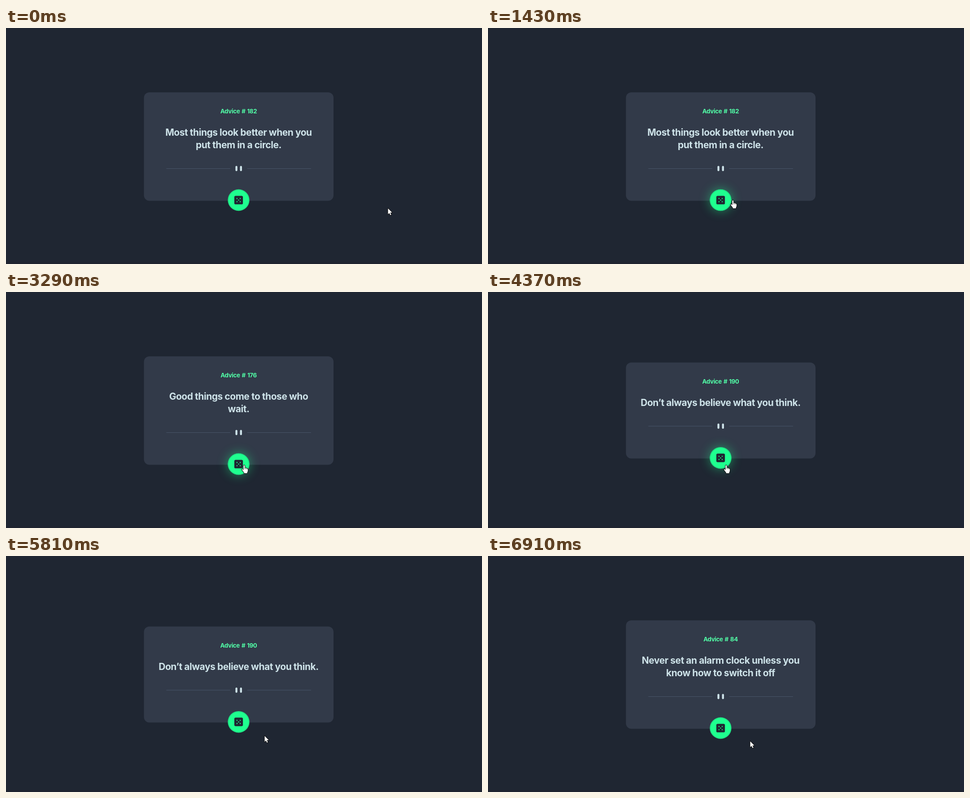
Recreate the animation shown at these times as an HTML page with a canvas. Size 1061 px wide and 528 px high, loop 8060 ms.

```html
<!DOCTYPE html>
<html lang="en">
<head>
<meta charset="utf-8">
<title>Advice generator</title>
<style>
  html, body { margin: 0; width: 100%; height: 100%; overflow: hidden; background: #1f2632; }
  canvas { position: absolute; left: 0; top: 0; width: 1061px; height: 528px; }
  p {
    position: absolute; left: 308px; width: 421px; margin: 0;
    text-align: center; white-space: pre; font-family: Inter, "Open Sans", sans-serif; font-weight: 700;
  }
  #label { top: 175.5px; font-size: 13.4px; line-height: 20px; letter-spacing: -0.4px; word-spacing: 1.2px; color: #52ffa8; }
  #quote { top: 220.4px; font-size: 21px; line-height: 28px; letter-spacing: -0.47px; color: #cee3e9; }
</style>
</head>
<body>
<canvas id="stage"></canvas>
<p id="label"></p>
<p id="quote"></p>
<script>
const LOOP = 8060, W = 1061, H = 528, CX = 518.5;
const GREEN = '#1fff8f', DARK = '#1f2632', PALE = '#cee3e9';

const canvas = document.getElementById('stage');
const label = document.getElementById('label');
const quote = document.getElementById('quote');
const ctx = canvas.getContext('2d');
const dpr = window.devicePixelRatio || 1;
canvas.width = W * dpr;
canvas.height = H * dpr;

const advices = [
  { at: 0, id: 182, text: 'Most things look better when you\nput them in a circle.' },
  { at: 2280, id: 176, text: 'Good things come to those who\nwait.' },
  { at: 4370, id: 190, text: 'Don’t always believe what you think.', small: true },
  { at: 5900, id: 84, text: 'Never set an alarm clock unless you\nknow how to switch it off' }
];

// Pointer strokes: first and last step time, step count, end point, optional curve control.
const strokes = [
  { from: 250, to: 980, n: 11, end: [536, 392], ctrl: [640, 480] },
  { from: 1070, to: 1210, n: 3, end: [526, 386] },
  { from: 1430, to: 1430, n: 1, end: [545, 385] },
  { from: 1500, to: 1790, n: 5, end: [574, 413] },
  { from: 2280, to: 2350, n: 2, end: [572, 411] },
  { from: 2630, to: 2630, n: 1, end: [552, 397] },
  { from: 2710, to: 2710, n: 1, end: [544, 393] },
  { from: 2850, to: 3290, n: 7, end: [530, 387] },
  { from: 4800, to: 4860, n: 2, end: [530, 378] },
  { from: 5020, to: 5530, n: 8, end: [585, 419] },
  { from: 5810, to: 5810, n: 1, end: [576, 402] },
  { from: 5900, to: 5900, n: 1, end: [574, 400] },
  { from: 6110, to: 6440, n: 6, end: [534, 388] },
  { from: 6510, to: 6910, n: 6, end: [584, 414] }
];

const arrow = new Path2D('M0 0V13.2L3 10.4L5.1 15.2L7.2 14.3L5.1 9.6H9.2Z');
const hand = new Path2D('M-1 1.2Q-1 0 .3 0T1.7 1.2V5.6L3.6 5.9Q4.4 6 4.6 6.5L6.2 6.8Q7 7 7.1 7.5' +
  'Q8.6 7.7 8.6 9V12.4Q8.4 14.6 7.2 16V18H.2V16.4L-3.6 11.6Q-5.3 9.6-4.4 8.8Q-3.4 8.2-1.9 9.8L-1 10.7Z');
const knuckles = new Path2D('M1.7 5.6V9M4.4 6.4V9M6.8 7.3V9.3');

const ease = u => u * u * (3 - 2 * u);

function pointerAt(t) {
  let pos = [851, 403];
  for (const s of strokes) {
    if (t < s.from) break;
    const step = s.n > 1 ? Math.floor((t - s.from) / (s.to - s.from) * (s.n - 1) + 1e-6) + 1 : 1;
    const u = ease(Math.min(1, step / s.n));
    pos = pos.map((a, i) => {
      const b = s.end[i];
      const c = s.ctrl ? s.ctrl[i] : (a + b) / 2;
      return (1 - u) * (1 - u) * a + 2 * u * (1 - u) * c + u * u * b;
    });
  }
  return pos;
}

function box(x, y, w, h, r, color) {
  ctx.fillStyle = color;
  ctx.beginPath();
  ctx.roundRect(x, y, w, h, r);
  ctx.fill();
}

function disc(x, y, r, color) {
  ctx.fillStyle = color;
  ctx.beginPath();
  ctx.arc(x, y, r, 0, Math.PI * 2);
  ctx.fill();
}

function drawDivider(y) {
  const k = 0.7265, x = 357.4;
  for (const start of [0, 248]) box(x + start * k, y - k / 2, 196 * k, k, 0, '#4f5d74');
  for (const start of [212, 226]) box(x + start * k, y - 8 * k, 6 * k, 16 * k, 3 * k, PALE);
}

function drawButton(y, hover) {
  if (hover) {
    ctx.save();
    ctx.shadowColor = 'rgba(31,255,143,0.48)';
    ctx.shadowBlur = 24 * dpr;
    disc(CX, y, 24, GREEN);
    ctx.restore();
  }
  disc(CX, y, 24.2, '#20d980');
  disc(CX, y, 22.6, GREEN);
  box(CX - 9.6, y - 9.6, 19.2, 19.2, 3.2, DARK);
  const d = 3.6;
  for (const [dx, dy] of [[0, 0], [-d, -d], [d, -d], [-d, d], [d, d]]) disc(CX + dx, y + dy, 1.2, GREEN);
}

function drawPointer([x, y], hover) {
  const shape = hover ? hand : arrow;
  ctx.save();
  ctx.translate(Math.round(x) + 0.5, Math.round(y) + 0.5);
  ctx.lineJoin = 'round';
  ctx.strokeStyle = '#000';
  ctx.lineWidth = 1.8;
  ctx.stroke(shape);
  ctx.fillStyle = '#fff';
  ctx.fill(shape);
  if (hover) {
    ctx.lineWidth = 0.7;
    ctx.stroke(knuckles);
  }
  ctx.restore();
}

function setText(el, text) {
  if (el.textContent !== text) el.textContent = text;
}

function draw(t) {
  const advice = advices.filter(a => a.at <= t).pop();
  const shift = advice.small ? 13.8 : 0;
  const buttonY = 385 - shift;
  const pos = pointerAt(t);
  const hover = Math.hypot(pos[0] - CX, pos[1] - buttonY) < 26.6;

  ctx.setTransform(dpr, 0, 0, dpr, 0, 0);
  box(0, 0, W, H, 0, DARK);
  box(0, 524, W, 4, 0, '#1f2430');
  box(307.5, 144 + shift, 422.5, 242.4 - 2 * shift, 12, '#323a49');
  drawDivider(314.4 - shift * 1.03);
  drawButton(buttonY, hover);
  drawPointer(pos, hover);

  setText(label, 'Advice # ' + advice.id);
  setText(quote, advice.text);
  label.style.transform = quote.style.transform = `translateY(${shift}px)`;
}

const begin = performance.now();
function tick() {
  draw((performance.now() - begin) % LOOP);
  requestAnimationFrame(tick);
}
tick();
</script>
</body>
</html>
```
